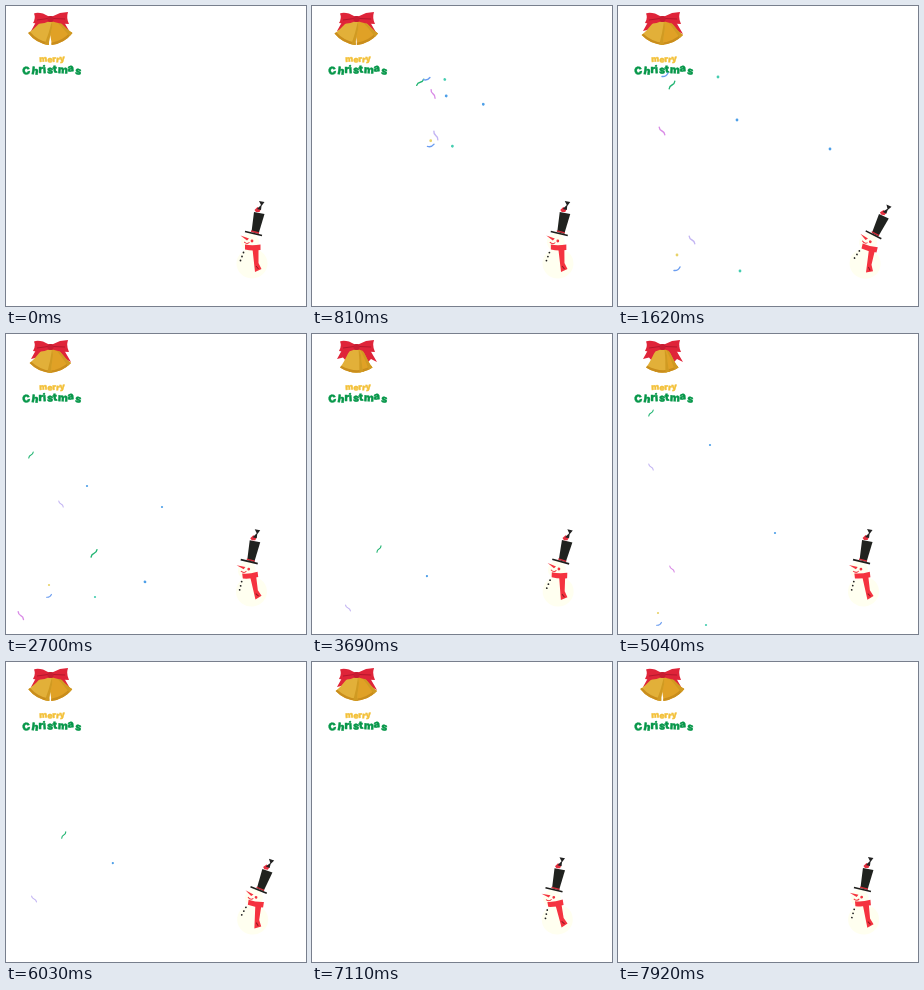
An HTML page that plays this animation: 300 px wide and 300 px high, repeating every 8010 ms.

```html
<!DOCTYPE html>
<html lang="en">
<head>
<meta charset="utf-8">
<title>Merry Christmas</title>
<style>
  html, body { margin: 0; width: 100%; height: 100%; overflow: hidden; background: #fff; }
  svg { display: block; width: 100vw; height: 100vh; }
  text { font-family: Inter, "Open Sans", sans-serif; font-weight: 900; stroke-width: .4; }
  .merry { font-size: 8.3px; fill: #f3c13a; stroke: #f3c13a; }
  .christmas { font-size: 10.5px; letter-spacing: .35px; fill: #07974a; stroke: #07974a; }
  .squiggle { fill: none; stroke-width: 1.4; stroke-linecap: round; }
</style>
</head>
<body>
<svg viewBox="0 0 300 300">
  <defs>
    <g id="bell">
      <path d="M-3 2C-8 6-7 14-12 23Q0 28 12 23C7 14 8 6 3 2Z"/>
      <path d="M-12 23Q0 28 12 23L11 21Q0 25-11 21Z" fill="#c98d1c"/>
      <path d="M3 2C8 6 7 14 12 23L8 24.500Q6 12 3 2Z" fill="#d09a22"/>
    </g>
  </defs>

  <g id="snowman">
    <ellipse cx="246" cy="257.500" rx="15.500" ry="15" fill="#fffff0"/>
    <circle cx="244" cy="236" r="9" fill="#fffff0"/>
    <g fill="#222">
      <circle cx="237.500" cy="246.500" r=".9"/>
      <circle cx="236" cy="250.500" r=".9"/>
      <circle cx="234.500" cy="254.500" r=".9"/>
    </g>
    <g fill="#f5333f">
      <path d="M239 238.500Q246 240 254.500 238.500L254.500 244Q246 245 239 243.500Z"/>
      <path d="M246.500 243H252.500L252.500 257L255.500 263L249 266Z"/>
      <path d="M234.500 229.500L243 232.500L241 234.500Z"/>
      <circle cx="246" cy="235" r="1.4"/>
      <path d="M238 236Q241 239 243.500 236.500" fill="none" stroke="#f5333f"/>
    </g>
    <path d="M250 260L252.500 263" stroke="#8f1822"/>
    <g id="hat">
      <path d="M239 225.500L256 229.500" stroke="#1d1d1b" stroke-width="1.600"/>
      <path d="M245.500 226L252.500 228L258.500 208L248 206Z" fill="#20221f"/>
      <path d="M245 225L253 227" stroke="#d92b38" stroke-width="1.300"/>
      <path d="M248.500 204L251.500 201L255 203L253.500 206L250 206Z" fill="#e52f3f"/>
      <path d="M251 203L255 199L253 195L258.500 196L255.500 200L255 204Z" fill="#222"/>
    </g>
  </g>

  <g fill="#df2439">
    <path d="M43 13L30 16L25 25L31 23.500L34 27L45 17Z"/>
    <path d="M45 13L58 16L65 28L59 25L56 28L44 17Z"/>
  </g>
  <use id="right" href="#bell" fill="#e0a126"/>
  <use id="left" href="#bell" fill="#e2b039"/>
  <g fill="#df2439">
    <path d="M44 11L37 7.500Q31 6 28 7.500Q30 12 27 17Q36 19 44 15Z"/>
    <path d="M45 11L54 7L62 6Q60 12 63 18Q53 18 45 15Z"/>
    <path d="M31 14L42 12.500M59 13L47 12.500" stroke="#b5172c"/>
    <rect x="41.500" y="10" width="6" height="6" rx="2" fill="#c81c31"/>
  </g>
  <text class="merry" x="33.500" y="56" dy="0 .3 -.3 .3 -.8" rotate="-4 4 -4 4 -4">merry</text>
  <text class="christmas" x="17" y="69" dy="0 -.9 -.8 0 0 -.3 0 -1 2"
    rotate="-10 8 0 -6 6 -6 4 -8 10">Christmas</text>
  <g id="confetti"></g>
</svg>

<script>
const LOOP = 8010, STEP = 90;
const el = id => document.getElementById(id);
const mix = (a, b, k) => a + (b - a) * k;

function track(keys, t) {
  const i = Math.max(1, keys.findIndex(k => k[0] >= t));
  const [t0, a] = keys[i - 1], [t1, b] = keys[i];
  return mix(a, b, (t - t0) / (t1 - t0));
}

// Time in ms and tilt in degrees.
const sway = [
  [0, 0], [450, -6], [900, 1], [1620, 13.5], [1800, 18], [2520, 0], [2700, -7],
  [3000, -10], [3690, 2], [4050, 12], [4300, 20], [4950, -3], [5040, -6.5], [5400, -10],
  [5800, 4], [6450, 17], [6600, 14], [7110, -9], [7500, 7], [7920, -5], [LOOP, 0]
];

// Time in ms and completed bell swings.
const swings = [
  [0, 0], [1620, 2.18], [2700, 3.82], [3690, 5.45], [5040, 7.45],
  [7110, 10.82], [7920, 11.95], [LOOP, 12]
];

const colors = {
  green: "#22b573", teal: "#45cdb0", blue: "#4d9fe8", curl: "#6b9df0",
  pink: "#d98be6", lilac: "#c3b5f3", yellow: "#e8d36a"
};
const dots = ["teal", "blue", "yellow"];
const leanLeft = ["pink", "lilac"];

// Pieces: kind, position at mid, then drift per second for the lasting ones.
const bursts = [
  { start: 720, mid: 1620, size: 1, from: [150, 130], last: 1.5, pieces: [
    ["teal", 100, 71], ["blue", 119, 114, 18.5, 124], ["green", 54, 79, 31.5, 130],
    ["curl", 47, 69], ["pink", 44, 125, -27, 145], ["blue", 212, 143],
    ["lilac", 74, 234], ["yellow", 59, 249], ["curl", 59, 263], ["teal", 122, 265]] },
  { start: 1800, mid: 2700, size: .8, from: [110, 190], last: 1.45, pieces: [
    ["green", 25, 121, 42.4, 95], ["blue", 81, 152, 34.3, 91], ["lilac", 55, 170, -19.2, 105],
    ["blue", 156, 173], ["yellow", 43, 251], ["curl", 43, 262], ["teal", 89, 263]] },
  { start: 4500, mid: 5040, size: .8, from: [120, 215], last: 1.7, pieces: [
    ["green", 33, 79, 25, 95], ["blue", 92, 111, 15, 91], ["lilac", 33, 133, -5, 105],
    ["blue", 157, 199], ["pink", 54, 235, -20, 105], ["yellow", 40, 279],
    ["curl", 41, 290], ["teal", 88, 291]] }
];

function makePiece([kind]) {
  const dot = dots.includes(kind);
  const node = document.createElementNS("http://www.w3.org/2000/svg", dot ? "circle" : "path");
  if (dot) {
    node.setAttribute("r", 1.4);
    node.setAttribute("fill", colors[kind]);
  } else {
    const shape = kind === "curl" ? "M-3 1.500Q1 2 3 -2" : "M-2.800 3.800Q-2.500 1 0 0T2.800 -3.800";
    node.setAttribute("d", shape);
    node.setAttribute("class", "squiggle");
    node.setAttribute("stroke", colors[kind]);
  }
  return el("confetti").appendChild(node);
}
for (const b of bursts) b.nodes = b.pieces.map(makePiece);

function drawBurst(b, t) {
  const after = (t - b.mid) / 1000;
  const u = Math.min(1, (t - b.start) / (b.mid - b.start));
  const ease = 1 - (1 - u) ** 4;
  b.pieces.forEach(([kind, px, py, vx = 0, vy], i) => {
    const last = vy ? b.last : .95;
    const node = b.nodes[i];
    const shown = u > 0 && after < last;
    node.style.display = shown ? "" : "none";
    if (!shown) return;
    const x = mix(b.from[0], px, ease) + vx * after * ease;
    const y = mix(b.from[1], py, ease) + (vy || 130 * b.size) * after * ease;
    const flip = leanLeft.includes(kind) ? -1 : 1;
    const turn = 12 * Math.sin(after * 6);
    node.setAttribute("transform",
      `translate(${x} ${y}) rotate(${turn}) scale(${flip * b.size} ${b.size})`);
    node.setAttribute("opacity", Math.min(1, (last - after) / .3));
  });
}

function frame(now) {
  const t = Math.floor(now % LOOP / STEP) * STEP;
  const tilt = track(sway, t);
  el("snowman").setAttribute("transform", `rotate(${tilt} 246 262)`);
  // The hat keeps its lean when the body swings left.
  el("hat").setAttribute("transform", `rotate(${Math.max(0, -tilt)} 247 227)`);
  const spread = 20 + 10 * Math.cos(2 * Math.PI * track(swings, t));
  el("left").setAttribute("transform", `translate(44 13) rotate(${spread})`);
  el("right").setAttribute("transform", `translate(44.500 13) rotate(${-spread})`);
  for (const b of bursts) drawBurst(b, t);
  requestAnimationFrame(frame);
}
frame(performance.now());
</script>
</body>
</html>
```
